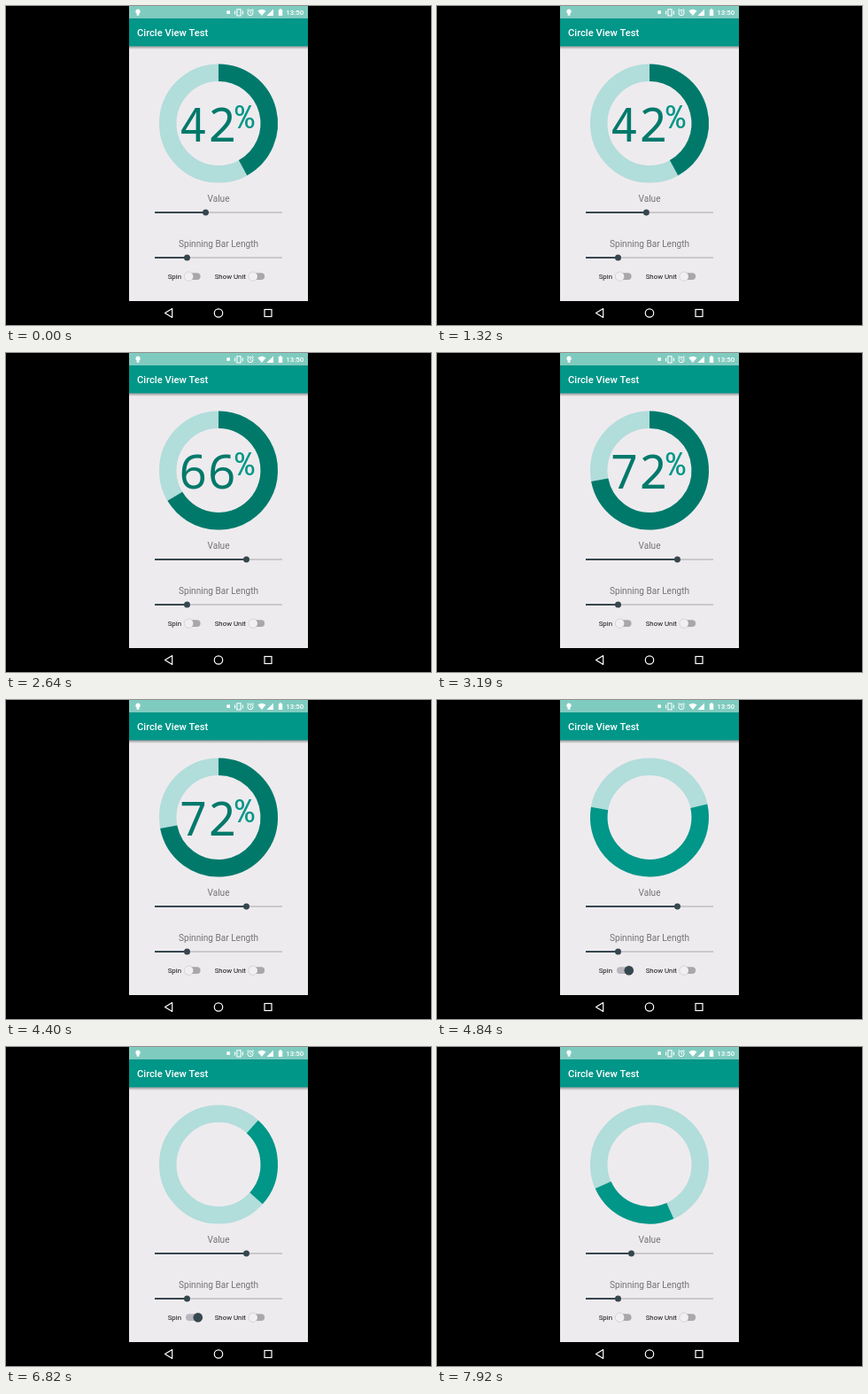
Write an HTML page that moves like this. It is 480 by 360 pixels and loops after 8000 ms.

```html
<!DOCTYPE html>
<html lang="en">
<head>
<meta charset="utf-8">
<title>Circle View Test</title>
<style>
  html, body { margin: 0; width: 100%; height: 100%; overflow: hidden; background: #000; }
  svg { display: block; width: 480px; height: 360px; font-family: Roboto, sans-serif; }
  .mono { font-family: "Noto Sans Mono", monospace; }
  .plain { font-family: "Noto Sans", sans-serif; }
</style>
</head>
<body>
<svg viewBox="0 0 480 360">
  <defs>
    <linearGradient id="shade" x2="0" y2="1">
      <stop stop-color="#000" stop-opacity=".35"/>
      <stop offset="1" stop-color="#000" stop-opacity="0"/>
    </linearGradient>
    <g id="slider">
      <path d="M168 0H312" stroke="#bfbdbf" stroke-width="1.3"/>
    </g>
  </defs>
  <rect width="480" height="360"/>
  <rect x="139" width="202" height="333" fill="#eeebee"/>
  <rect x="139" width="202" height="14" fill="#80cbc0"/>
  <rect x="139" y="14" width="202" height="31.5" fill="#009688"/>
  <rect x="139" y="45.5" width="202" height="3.5" fill="url(#shade)"/>

  <!-- status bar -->
  <g fill="#fff">
    <path d="M149 3.6a2.7 2.7 0 0 1 1.4 5v2.2h-2.8v-2.2a2.7 2.7 0 0 1 1.4-5z"/>
    <rect x="249.3" y="5.3" width="3.6" height="3.6"/>
    <path d="M258.6 5.5v4M267.4 5.5v4M260.9 3.8h4.2v7.2h-4.2z" fill="none" stroke="#fff" stroke-width="1.1"/>
    <g fill="none" stroke="#fff">
      <circle cx="276" cy="7.6" r="3.1"/>
      <path d="M276 5.8v2l1.3.8M272.2 4.8l1.8-1.5M279.8 4.8l-1.8-1.5" stroke-width=".9"/>
    </g>
    <path d="M284.3 5.4q4.6-3.2 9.2 0L288.9 11z"/>
    <path d="M302 3.4v7.6h-7.6z"/>
    <path d="M307.8 4.2h1.2v-.9h2v.9h1.2v6.8h-4.4z"/>
    <text x="316.3" y="10.4" font-size="7.9" font-weight="500">13:50</text>
    <text x="148" y="34" font-size="11.2" font-weight="500">Circle View Test</text>
  </g>

  <!-- ring -->
  <g fill="none" stroke-width="19.5">
    <circle cx="240" cy="132.5" r="57.25" stroke="#b1dddb"/>
    <path id="arc"/>
  </g>
  <g id="label" fill="#00796b" font-size="53" text-anchor="middle">
    <text id="tens" class="mono" x="211.5" y="152.5"></text>
    <text id="ones" x="244" y="152.5"></text>
    <text class="mono" x="269.5" y="138" font-size="36" fill="#009688">%</text>
  </g>

  <g fill="#757375" font-size="10.1" text-anchor="middle">
    <text x="240" y="221.3">Value</text>
    <text x="240" y="272.2">Spinning Bar Length</text>
  </g>
  <use href="#slider" y="233"/>
  <use href="#slider" y="284"/>
  <g stroke="#37474f" stroke-width="1.8" fill="#37474f">
    <path id="fill" d="M168 233H225.5"/>
    <circle id="thumb" cx="225.5" cy="233" r="2.6"/>
    <path d="M168 284H204.5"/>
    <circle cx="204.5" cy="284" r="2.6"/>
  </g>

  <g font-size="7.85" fill="#111">
    <text x="182.7" y="308">Spin</text>
    <text x="235.7" y="308">Show Unit</text>
  </g>
  <g fill="#a9a7a9">
    <rect id="track" x="203" y="301.2" width="16.6" height="7.8" rx="3.9"/>
    <rect x="275.5" y="301.2" width="16.6" height="7.8" rx="3.9"/>
  </g>
  <g stroke="#000" stroke-opacity=".13" stroke-width=".8" fill="#f1eff1">
    <circle id="knob" cx="206.5" cy="305.2" r="5.2"/>
    <circle cx="279" cy="305.2" r="5.2"/>
  </g>

  <!-- navigation bar -->
  <g fill="none" stroke="#fff" stroke-width="1.2">
    <path d="M187.7 341.6v9.8l-8.2-4.9z" stroke-linejoin="round"/>
    <circle cx="240" cy="346.5" r="4.7"/>
    <rect x="292" y="342.5" width="8" height="8"/>
  </g>
</svg>
<script>
const $ = id => document.getElementById(id);
const set = (id, attrs) => {
  for (const k in attrs) $(id).setAttribute(k, attrs[k]);
};
const LOOP = 8000, STEP = 110, SPIN_START = 4565, DURATION = 1500;
const phase = (t, start, length) => Math.min(1, Math.max(0, (t - start) / length));
const smooth = p => (1 - Math.cos(Math.PI * p)) / 2;
const ramp = (t, start, length) => smooth(phase(t, start, length));

// Leading edge of the spinner: [time, degrees]
const headKeys = [[SPIN_START, 259.2], [4840, 280], [5610, 360], [6820, 492], [7920, 606]];
function headAt(t) {
  let i = 1;
  while (i < headKeys.length - 1 && t > headKeys[i][0]) i++;
  const [t0, a0] = headKeys[i - 1], [t1, a1] = headKeys[i];
  return a0 + (a1 - a0) * (t - t0) / (t1 - t0);
}

const point = deg => {
  const a = (deg - 90) * Math.PI / 180;
  return `${240 + 57.25 * Math.cos(a)} ${132.5 + 57.25 * Math.sin(a)}`;
};

function draw(t) {
  const spinning = t >= SPIN_START;
  const value = 42 + 30 * ramp(t, 1565, DURATION);
  let head = value * 3.6, length = head;
  if (spinning) {
    const left = 1 - phase(t, SPIN_START, DURATION);
    head = headAt(t);
    length = 90 + 169.2 * left * left;
  }
  set("arc", {
    d: `M${point(head - length)}A57.25 57.25 0 ${+(length > 180)} 1 ${point(head)}`,
    stroke: spinning ? "#009688" : "#00796b"
  });

  set("label", { visibility: spinning ? "hidden" : "visible" });
  const [tens, ones] = String(Math.floor(value + 1e-6));
  $("tens").textContent = tens;
  $("ones").textContent = ones;
  // The monospaced zero is slashed, so it takes the plain face
  set("ones", { class: ones === "0" ? "plain" : "mono" });

  const x = 225.5 + 46 * ramp(t, 1210, 340) - 52 * ramp(t, 7480, 340);
  set("fill", { d: `M168 233H${x}` });
  set("thumb", { cx: x });

  const on = ramp(t, 4450, 250) - ramp(t, 7670, 250);
  const mix = (a, b) => Math.round(a + (b - a) * on);
  set("knob", {
    cx: 206.5 + 10.3 * on,
    fill: `rgb(${mix(241, 55)},${mix(239, 71)},${mix(241, 79)})`
  });
  set("track", { fill: `rgb(${mix(169, 184)},${mix(167, 182)},${mix(169, 190)})` });
}

const begin = performance.now();
function tick() {
  const t = (performance.now() - begin) % LOOP;
  draw(Math.floor(t / STEP) * STEP);
  requestAnimationFrame(tick);
}
tick();
</script>
</body>
</html>
```
